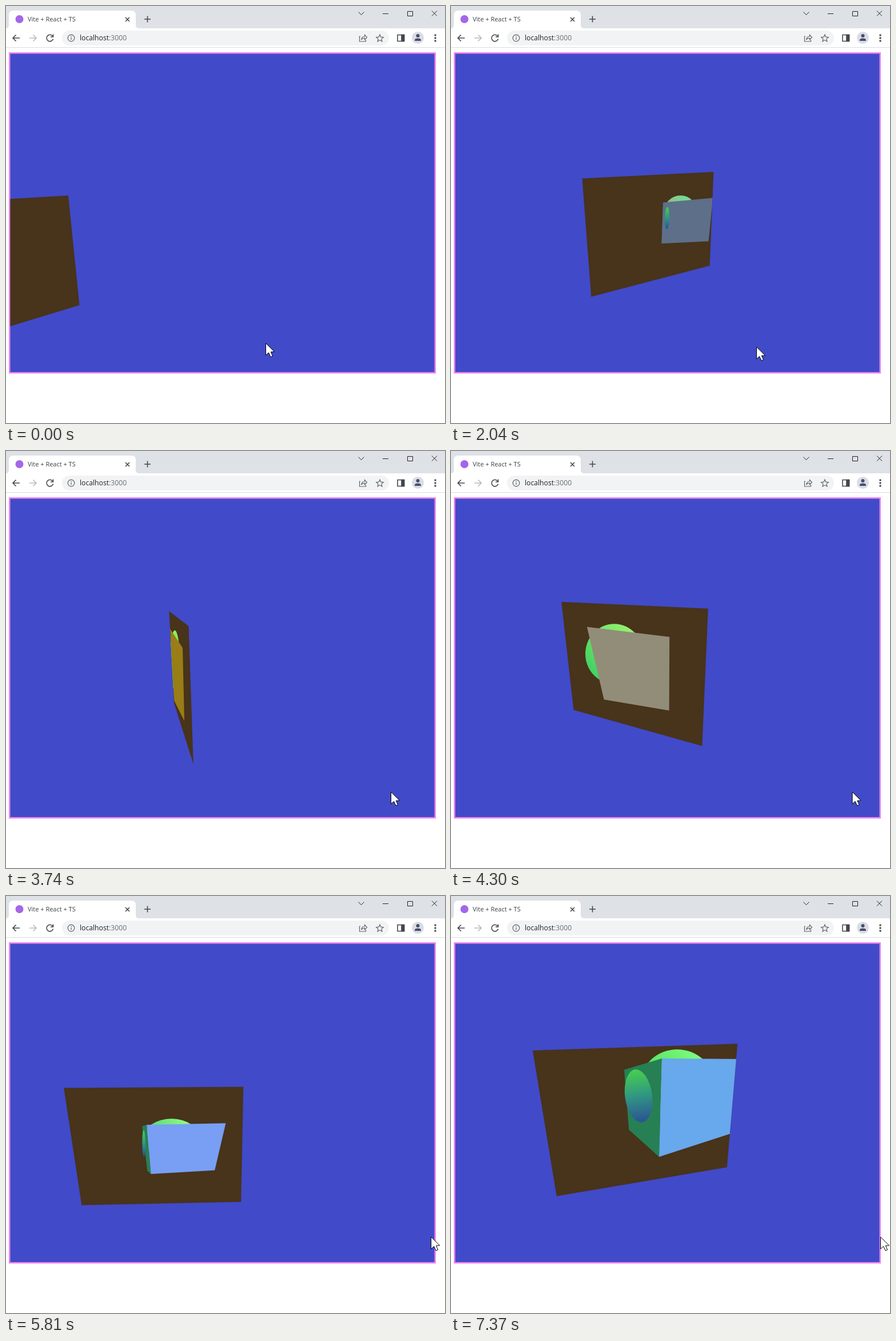
Animation, 768 px wide and 729 px high, one loop 7620 ms. Source, as an HTML page with a canvas:

```html
<!DOCTYPE html>
<html lang="en">
<head>
<meta charset="utf-8">
<title>Portal scene</title>
<style>
html, body { margin: 0; width: 100%; height: 100%; overflow: hidden; background: #fff; }
svg, canvas { position: absolute; left: 0; top: 0; width: 768px; height: 729px; }
text { font-family: "Open Sans", "Noto Sans", sans-serif; }
</style>
</head>
<body>
<svg viewBox="0 0 768 729" fill="none" stroke="#44474b" stroke-width="1.6">
  <g stroke="none">
    <path fill="#dee1e6" d="M0 0h768v39H0z"/>
    <path fill="#fff" d="M0 39q5 0 5-6V16q0-8 8-8h206q8 0 8 8v17q0 6 6 6z"/>
    <path fill="#dadce0" d="M0 72h768v1H0z"/>
    <rect x="98" y="43" width="572" height="26" rx="13" fill="#f1f3f4"/>
    <circle cx="23.5" cy="23" r="7" fill="#a367e8"/>
    <text x="38" y="27" font-size="11" fill="#3c4043">Vite + React + TS</text>
    <text x="129" y="60" font-size="12.2" fill="#202124">localhost<tspan fill="#6b6f74">:3000</tspan></text>
    <circle cx="720.5" cy="55.5" r="10.5" fill="#dadce6"/>
    <circle cx="720.5" cy="52" r="3" fill="#46506a"/>
    <path fill="#46506a" d="M715 61v-1.5q0-3 5.500-3t5.500 3V61z"/>
    <path fill="#44474b" d="M749.500 49.500h3v3h-3zm0 5h3v3h-3zm0 5h3v3h-3z"/>
  </g>
  <path d="M209 20l7 7m0-7l-7 7M242 23h11m-5.500-5.500v11M24 56H12m5.500-5.500L12 56l5.500 5.500"/>
  <path stroke="#b8babd" d="M41 56h12m-5.500-5.500L53 56l-5.500 5.500"/>
  <path d="M81.500 52.500a5.800 5.800 0 1 0 1 5M82.500 49.500v4.500H78"/>
  <g stroke="#5f6368" stroke-width="1.200">
    <circle cx="114" cy="56" r="5.800"/><path d="M114 55v4M114 52.500v1.400"/>
    <path d="M620 53h-1.500v9h11v-3M621.500 59q1-6 6-6v-2.500l4 4.200-4 4v-2.700q-4 0-6 3z"/>
    <path d="M654 50l1.800 4.200 4.500.4-3.400 3 1 4.400-3.900-2.400-3.900 2.400 1-4.400-3.400-3 4.500-.4z"/>
  </g>
  <path d="M685 50.500h11.500v11H685z"/><path fill="#44474b" d="M692 50.500h4.500v11H692z"/>
  <path stroke="#222" stroke-width="1" d="M616.500 10.500l5 5 5-5M659 13.500h10M702.500 9.500h9v8h-9zM745 8.500l9 9m0-9l-9 9"/>
  <rect x="6.250" y="82.250" width="744.500" height="559" fill="#414ac9" stroke="#ee82ee" stroke-width="2.500"/>
</svg>
<canvas width="768" height="729"></canvas>
<script>
const LOOP = 7620, STEP = 75;
const ctx = document.querySelector('canvas').getContext('2d');

// time, portal centre x y z seen from the camera, yaw, pitch, pointer x
const path = [
  [0, -4.19, 1.24, 5.68, .82, .172, 454],
  [600, -1.1, .06, 6, .8, .25, 459],
  [1270, .92, .58, 6.99, 1.072, .226, 473],
  [2680, -1.26, .36, 7.31, .186, .247, 589],
  [3740, -.89, .45, 6.75, -1.325, .266, 673],
  [4620, -.65, .15, 5.7, 0, .3, 722],
  [4940, -.76, .58, 6.46, 0, .292, 733],
  [5890, -1.3, 1.2, 6.2, .05, .24, 745],
  [6610, -.13, 1.19, 9.86, .317, .219, 750],
  [7370, -.33, .35, 5.45, .345, .327, 751]
];

// time, front face of the box, depth of its side; colours: front, dome left and right
const poses = [
  [1270, [453,355, 488,340, 481,410, 451,420], -24, '498017 60d030 90f060'],
  [2680, [312,334, 425,331, 424,408, 311,408], 0, '705ff0 e878c0 50d8d0'],
  [3740, [287,311, 309,344, 312,472, 294,436], 0, '997d16 50e040 90f060'],
  [4940, [260,346, 448,346, 419,455, 276,455], 0, '86a2f5 30c090 a8f880'],
  [6610, [380,402, 428,398, 423,434, 379,443], 16, '699bf0 50d060 80ff80'],
  [7370, [369,284, 520,285, 506,410, 364,456], 66, '68a8ec 40d050 80ff80']
];

// Values between two keys, advancing in the screen's update rhythm
function at(keys, t) {
  let i = keys.length - 1;
  while (keys[i][0] > t) i--;
  const a = keys[i], b = keys[i + 1];
  if (!b) return a.slice(1);
  const span = b[0] - a[0], n = Math.round(span / STEP);
  const p = Math.floor((t - a[0]) / span * n) / n;
  return a.slice(1).map((v, k) => v + (b[k + 1] - v) * p);
}

// Portal corners in perspective, clockwise from top left
function portal(t) {
  const [x, y, z, yaw, pitch] = at(path, t), { sin, cos } = Math;
  return [[-1.6, -1.5], [1.6, -1.5], [1.6, 1.5], [-1.6, 1.5]].flatMap(([u, v]) => {
    const depth = z + u * sin(yaw) * cos(pitch) + v * sin(pitch);
    return [378.5 + 572 * (x + u * cos(yaw)) / depth,
            361.5 + 455 * (y - u * sin(yaw) * sin(pitch) + v * cos(pitch)) / depth];
  });
}

function bounds(q) {
  const xs = q.filter((v, i) => i % 2 == 0), ys = q.filter((v, i) => i % 2);
  const x = Math.min(...xs), y = Math.min(...ys);
  return { x, y, w: Math.max(...xs) - x, h: Math.max(...ys) - y };
}

// The box is kept relative to the portal so it travels with it
const box = poses.map(([t, pts, side, colours]) => {
  const b = bounds(portal(t));
  return [t,
    ...pts.map((v, i) => i % 2 ? (v - b.y) / b.h : (v - b.x) / b.w),
    side,
    ...colours.match(/\w\w/g).map(h => parseInt(h, 16))];
});
box.unshift(box[0].map((v, i) => i == 0 ? 0 : i <= 8 && i % 2 ? v - .5 : v));

function trace(p) {
  ctx.beginPath();
  for (let i = 0; i < p.length; i += 2) ctx.lineTo(p[i], p[i + 1]);
  ctx.closePath();
}

function poly(p, fill) {
  trace(p);
  ctx.fillStyle = fill;
  ctx.fill();
}

// Ellipse shaded from one end of a diagonal to the other
function blob(x, y, rx, ry, tilt, colours, [x0, y0, x1, y1]) {
  const g = ctx.createLinearGradient(x + x0 * rx, y + y0 * ry, x + x1 * rx, y + y1 * ry);
  colours.forEach((c, i) => g.addColorStop(i / (colours.length - 1), c));
  ctx.beginPath();
  ctx.ellipse(x, y, rx, ry, tilt, 0, 7);
  ctx.fillStyle = g;
  ctx.fill();
}

function drawBox(b, s) {
  const f = s.slice(0, 8).map((v, i) => i % 2 ? b.y + v * b.h : b.x + v * b.w);
  const d = s[8], inset = Math.abs(d);
  const [front, left, right] = [9, 12, 15].map(i => `rgb(${s.slice(i, i + 3).map(Math.round)})`);
  const { x, w } = bounds(f), top = (f[1] + f[3]) / 2, h = (f[5] + f[7]) / 2 - top, edge = f[7] - f[1];

  blob(x + .33 * w - .3 * d, top + .3 * h, .35 * w + .15 * d, .41 * h, 0, [left, right], [-1, .4, .6, -1]);
  poly([f[0], f[1], f[0] - d, f[1] + .3 * inset, f[6] - .8 * d, f[7] - .72 * inset, f[6], f[7]], '#268054');
  poly(f, front);
  blob(f[0] - .62 * d, f[1] + .38 * edge, .36 * inset, .27 * edge, -d / 500,
    ['#48d04c', '#309682', '#2c5096'], [-.3, -1, .3, 1]);
}

function drawPointer(x, y) {
  ctx.save();
  ctx.translate(x + .5, y);
  trace([0,0, 0,21, 5,16.5, 8.5,24, 12,22.5, 8.8,15.3, 15,15]);
  ctx.fillStyle = '#fff';
  ctx.fill();
  ctx.stroke();
  ctx.restore();
}

function frame() {
  const t = performance.now() % LOOP, door = portal(t);
  ctx.clearRect(0, 0, 768, 729);
  ctx.save();
  ctx.beginPath();
  ctx.rect(7.5, 83.5, 742, 556.5);
  ctx.clip();
  poly(door, '#48331b');
  ctx.clip();
  drawBox(bounds(door), at(box, t));
  ctx.restore();
  drawPointer(at(path, t)[5], 589.5 + 6.5 * Math.min(1, t / 1270));
  requestAnimationFrame(frame);
}
frame();
</script>
</body>
</html>
```
